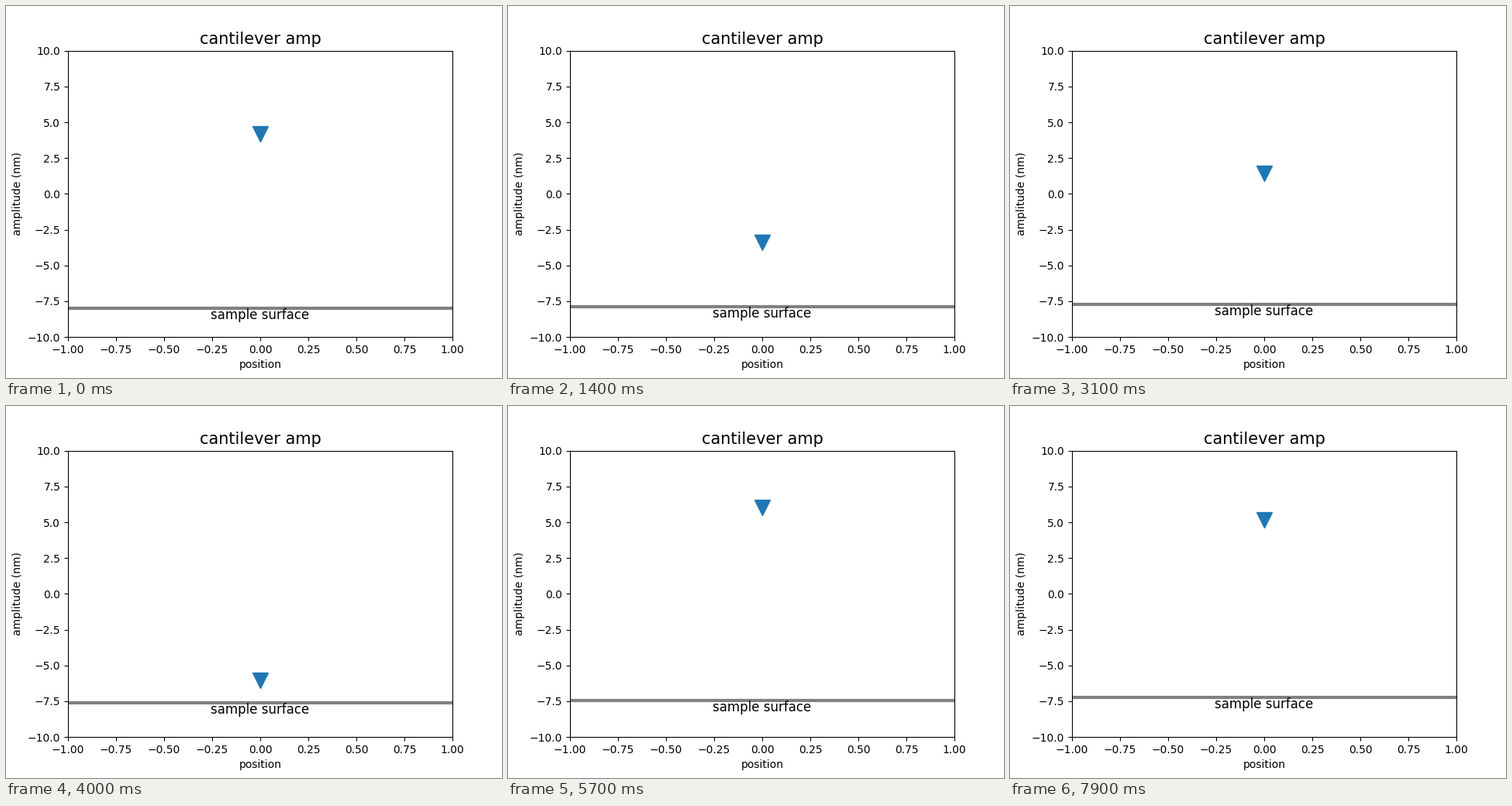
These frames come from a looping animation (640 by 480 pixels, 8 s). A matplotlib script:

```python
import numpy as np
import matplotlib.pyplot as plt
from matplotlib.animation import FuncAnimation

FRAMES = 80
INTERVAL = 100  # ms

plt.rcParams["font.family"] = "DejaVu Sans"


def tip_height(i):
    """Oscillation whose amplitude shrinks as the surface approaches."""
    return -0.22 + (6.42 - 0.002 * i) * np.cos(0.814 + 0.5397 * i)


def surface_height(i):
    return -8 + 0.01 * i


fig, ax = plt.subplots(figsize=(6.4, 4.8), dpi=100)
ax.set_xlim(-1, 1)
ax.set_ylim(-10, 10)
ax.set_title("cantilever amp", fontsize=15)
ax.set_xlabel("position")
ax.set_ylabel("amplitude (nm)")

tip, = ax.plot([0], [tip_height(0)], "v", color="tab:blue", markersize=15)
surface, = ax.plot([-1, 1], [surface_height(0)] * 2, color="gray", linewidth=3)
label = ax.text(0, surface_height(0) - 0.5, "sample surface",
                fontsize=12, ha="center", va="center")


def update(i):
    level = surface_height(i)
    tip.set_data([0], [tip_height(i)])
    surface.set_data([-1, 1], [level, level])
    label.set_y(level - 0.5)
    return tip, surface, label


anim = FuncAnimation(fig, update, frames=FRAMES, interval=INTERVAL,
                     repeat=True, repeat_delay=0)
plt.show()
```
